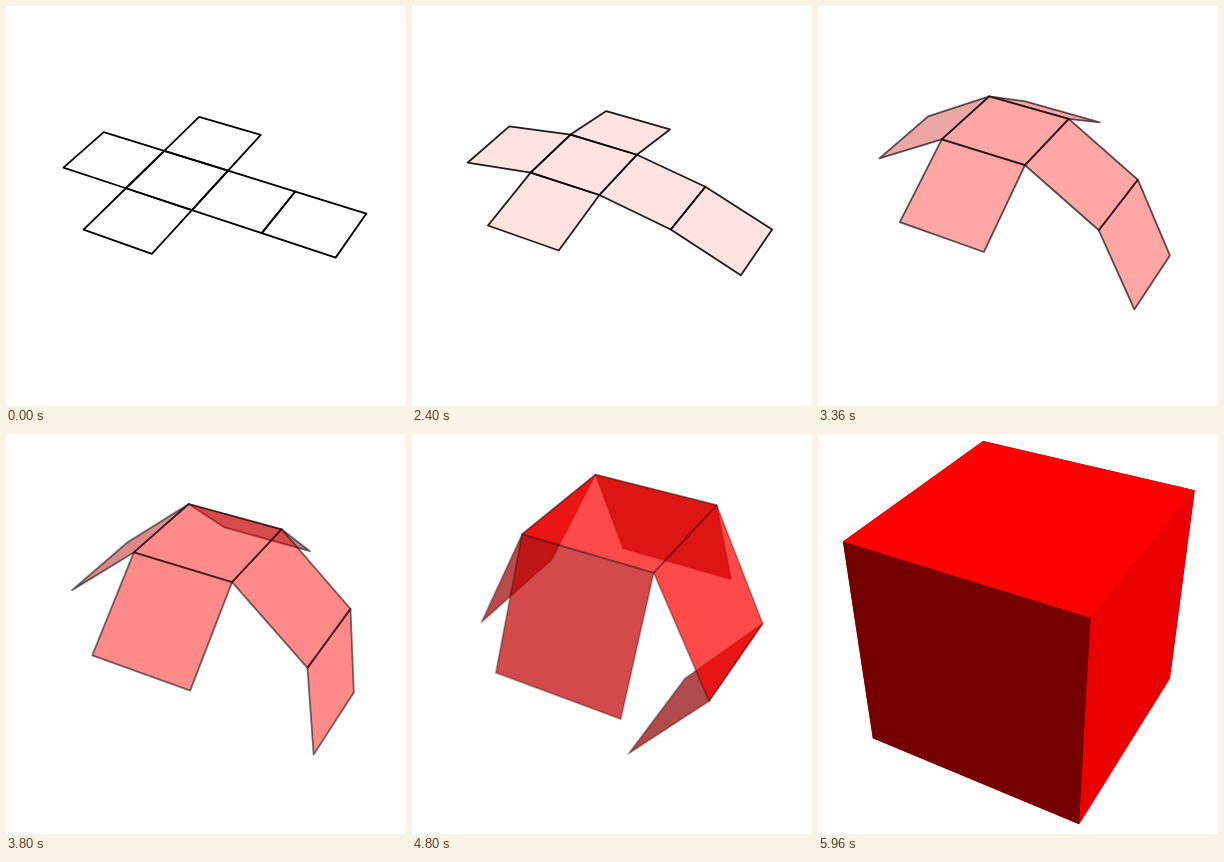
An HTML page with a canvas that plays this animation: 400 px wide and 400 px high, repeating every 7960 ms.

```html
<!DOCTYPE html>
<html lang="en">
<head>
<meta charset="utf-8">
<title>Folding cube net</title>
<style>
  html, body { margin: 0; width: 100%; height: 100%; overflow: hidden; background: #fff; }
  canvas { display: block; width: 100vw; height: 100vh; }
</style>
</head>
<body>
<canvas id="stage" width="400" height="400"></canvas>
<script>
const ctx = document.getElementById('stage').getContext('2d');

const HOLD = 2000, STEP = 40, STEPS = 100;
const LOOP = HOLD + (STEPS - 1) * STEP + HOLD;
const FIT = 398.7, MID = [200, 199.7], PAD = 1.04, LINE = 1.8;

const dot = (a, b) => a[0] * b[0] + a[1] * b[1] + a[2] * b[2];
const sub = (a, b) => a.map((v, i) => v - b[i]);
const cross = (a, b) => [
  a[1] * b[2] - a[2] * b[1],
  a[2] * b[0] - a[0] * b[2],
  a[0] * b[1] - a[1] * b[0]
];
const unit = a => a.map(v => v / Math.hypot(...a));

// Camera axes: right, up and towards the viewer
const VIEW = [1.3, -2.4, 2];
const W = unit(VIEW), R = unit(cross([0, 0, 1], W)), U = cross(W, R);
const toCam = p => [dot(p, R), dot(p, U), dot(p, W)];

const AMBIENT = 0.35, DIRECT = 0.37;
const LIGHTS = [[0, 1, 1], [1, 1, 1], [1, 0, 1]].map(unit);

// Faces in painting order, hinged around the fixed top square
function netFaces(angle) {
  const c = Math.cos(angle), s = Math.sin(angle);
  const x2 = 1 + c, x3 = x2 + Math.cos(2 * angle);
  const z3 = -s - Math.sin(2 * angle);
  return [
    [[-c, 0, -s], [0, 0, 0], [0, 1, 0], [-c, 1, -s]],
    [[0, 1, 0], [1, 1, 0], [1, 1 + c, -s], [0, 1 + c, -s]],
    [[x2, 0, -s], [x3, 0, z3], [x3, 1, z3], [x2, 1, -s]],
    [[0, 0, 0], [1, 0, 0], [1, 1, 0], [0, 1, 0]],
    [[1, 0, 0], [x2, 0, -s], [x2, 1, -s], [1, 1, 0]],
    [[0, -c, -s], [1, -c, -s], [1, 0, 0], [0, 0, 0]]
  ];
}

// Perspective view scaled so that the padded bounding box fits the stage
function makeCamera(points) {
  const axes = [0, 1, 2].map(i => {
    const vals = points.map(p => p[i]);
    let lo = Math.min(...vals), hi = Math.max(...vals);
    if (hi - lo < 1e-9) { lo -= 0.5; hi += 0.5; }
    return { mid: (lo + hi) / 2, half: (hi - lo) / 2 * PAD };
  });
  const center = axes.map(a => a.mid);
  const size = 2 * Math.max(...axes.map(a => a.half));
  const eye = center.map((v, i) => v + VIEW[i] * size);
  const dist = Math.hypot(...VIEW) * size;
  const flat = p => {
    const [x, y, z] = toCam(sub(p, center));
    return [x / (dist - z), -y / (dist - z)];
  };

  const corners = [];
  for (let n = 0; n < 8; n++) {
    corners.push(flat(axes.map((a, i) => a.mid + (n >> i & 1 ? a.half : -a.half))));
  }
  const span = [0, 1].map(i => {
    const vals = corners.map(q => q[i]);
    return [Math.min(...vals), Math.max(...vals)];
  });
  const scale = FIT / Math.max(...span.map(([lo, hi]) => hi - lo));
  const project = p => flat(p).map((v, i) =>
    MID[i] + (v - (span[i][0] + span[i][1]) / 2) * scale);
  return { eye, project };
}

// Brightness of the side turned to the viewer
function shade(face, eye) {
  let n = unit(cross(sub(face[1], face[0]), sub(face[3], face[0])));
  if (dot(n, sub(eye, face[0])) < 0) n = n.map(v => -v);
  const cam = toCam(n);
  const lit = LIGHTS.reduce((sum, l) => sum + Math.max(0, dot(cam, l)), 0);
  return Math.min(1, AMBIENT + DIRECT * lit);
}

function draw(t) {
  const faces = netFaces(t * Math.PI / 2);
  const { eye, project } = makeCamera(faces.flat());
  ctx.fillStyle = '#fff';
  ctx.fillRect(0, 0, 400, 400);
  ctx.lineWidth = LINE;
  ctx.lineJoin = 'round';
  for (const face of faces) {
    ctx.beginPath();
    face.forEach(p => ctx.lineTo(...project(p)));
    ctx.closePath();
    ctx.fillStyle = `rgba(${Math.round(255 * shade(face, eye))}, 0, 0, ${t})`;
    ctx.fill();
    if (t < 1) {
      ctx.strokeStyle = `rgba(0, 0, 0, ${1 - t})`;
      ctx.stroke();
    }
  }
}

function foldAt(ms) {
  if (ms < HOLD) return 0;
  return Math.min(STEPS, Math.floor((ms - HOLD) / STEP) + 1) / STEPS;
}

const start = performance.now();
let shown = -1;
function tick() {
  const t = foldAt((performance.now() - start) % LOOP);
  if (t !== shown) draw(shown = t);
  requestAnimationFrame(tick);
}
tick();
</script>
</body>
</html>
```
